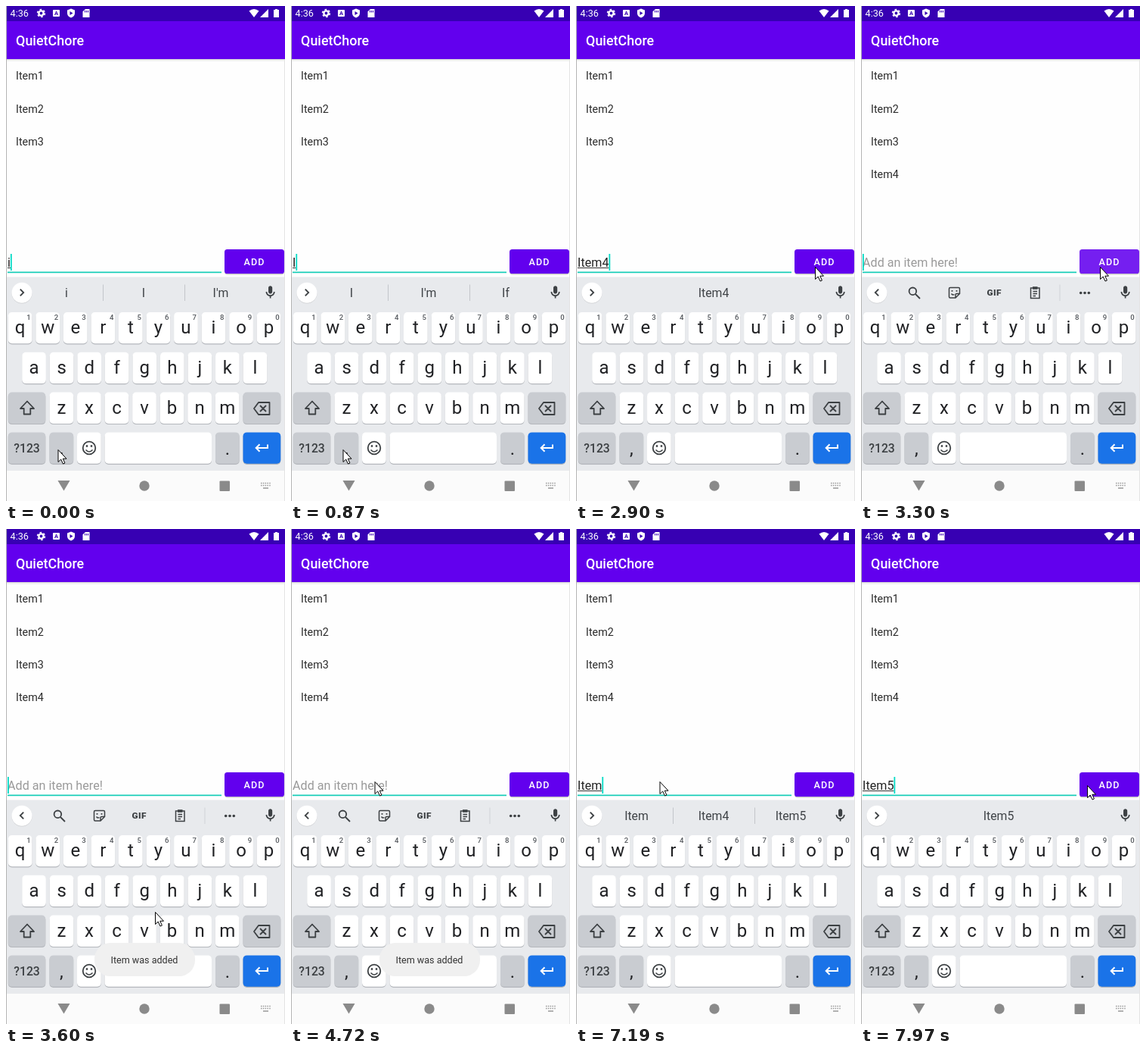
An HTML page that plays this animation: 369x653 px, repeating every 8 s.

```html
<!DOCTYPE html>
<html lang="en">
<head>
<meta charset="utf-8">
<title>To-do list</title>
<style>
  html, body { margin: 0; width: 100%; height: 100%; overflow: hidden; background: #fff; }
  svg { display: block; width: 369px; height: 653px; font-family: Roboto, "Noto Sans", sans-serif; }
  .mid { text-anchor: middle; }
  .line { fill: none; stroke: #3c4043; stroke-width: 1.8; }
</style>
</head>
<body>
<svg id="stage" viewBox="0 0 369 653">
  <rect width="369" height="653" fill="#fefefe"/>
  <rect y="70" width="369" height="1" fill="#000" opacity=".16"/>
  <rect y="71" width="369" height="2" fill="#000" opacity=".05"/>
  <rect y="20" width="369" height="50" fill="#6200ee"/>
  <rect width="369" height="20" fill="#3700b3"/>

  <g id="status" fill="#fff">
    <text x="5.5" y="14.2" font-size="12.7">4:36</text>
    <circle cx="46.5" cy="9.5" r="3.1" fill="none" stroke="#fff" stroke-width="2.4"/>
    <circle cx="46.5" cy="9.5" r="4.9" fill="none" stroke="#fff" stroke-width="1.6" stroke-dasharray="2.6 2.53"/>
    <rect x="62" y="5" width="9" height="9" rx="1"/>
    <text class="mid" x="66.5" y="12.3" font-size="7.5" font-weight="700" fill="#3700b3">A</text>
    <path d="M86 3.5l5 2v4c0 3-2 5-5 6-3-1-5-3-5-6v-4z"/>
    <path d="M84.5 7v5l4-2.5z" fill="#3700b3"/>
    <path d="M105 4h5.5v11h-9V7.5z"/>
    <path d="M104.5 6v2.5M106.5 6v2.5M108.5 6v2.5" stroke="#3700b3"/>
    <path d="M321.5 6.5q6.5-5 13 0L328 15z"/>
    <path d="M347 4v11h-11z"/>
    <path d="M354 5h2V4h3v1h2v10h-7z"/>
  </g>
  <text x="13" y="52.3" font-size="17.95" font-weight="500" fill="#fff">QuietChore</text>

  <g id="items" font-size="14.36" fill="#2b2b2b"></g>

  <g font-size="16.15">
    <text id="hint" x="2" y="344" fill="#9a9a9a">Add an item here!</text>
    <text id="entry" x="2" y="344" fill="#222"></text>
    <rect id="underline" x="2" y="345" height="1" fill="#333"/>
    <rect x="2" y="350.5" width="283" height="1.7" fill="#16cdb8"/>
    <rect id="caret" y="327" width="1.8" height="22" fill="#03dac5"/>
  </g>
  <rect x="289" y="322" width="79" height="32.5" rx="4" opacity=".2"/>
  <rect x="289" y="321" width="79" height="32" rx="3.6" fill="#6200ee"/>
  <rect id="ripple" x="289" y="321" width="79" height="32" rx="3.6" fill="#fff"/>
  <text x="314.5" y="342" font-size="12.57" font-weight="500" letter-spacing="1.12" fill="#fff">ADD</text>

  <rect y="357.5" width="369" height="255.5" fill="#e8eaed"/>
  <circle cx="21" cy="379" r="13.5" fill="#000" opacity=".12"/>
  <circle cx="21" cy="378.2" r="13.5" fill="#fff"/>
  <path id="chevron" class="line" d="M-2.2-4.4L2.2 0-2.2 4.4"/>
  <path transform="translate(339.3 367.5) scale(.86)" fill="#3c4043" d="M12 14c1.66 0 3-1.34 3-3V5c0-1.66-1.34-3-3-3S9 3.34 9 5v6c0 1.66 1.34 3 3 3zM17 11c0 2.76-2.24 5-5 5s-5-2.24-5-5H5c0 3.53 2.61 6.43 6 6.92V21h2v-3.08c3.39-.49 6-3.39 6-6.92z"/>

  <g id="words" class="mid" font-size="15.8" fill="#3f4347"></g>
  <path id="dividers" d="M128.5 367.5V389M236.5 367.5V389" stroke="#c3c6ca"/>
  <g id="tools">
    <g class="line">
      <circle cx="68.4" cy="376.3" r="4.8"/>
      <path d="M72 380l6 6"/>
      <path d="M118 371.5h11.5v8l-5 5H118q-1 0-1-1v-11q0-1 1-1zM130 379h-4.5q-1.500-1.500 5.500v5M120.500 379q2 3 4 1.500" stroke="none"/>
      <path d="M118 371.5h11q1.500 0 1.500 1.500v6.500l-5.500 5.500h-7q-1.500 0-1.500-1.500v-10.500q0-1.500 1.500-1.500zM130.500 379.500h-4q-1.500 0-1.500 1.500v4M119.500 379.500q2 2.500 4 1" stroke-width="1.500"/>
      <path d="M120.500 375v1.800M126.500 375v1.800"/>
      <path d="M224.500 372h11.500v13.500h-11.500zM227.500 376.500h5.500M227.500 379.500h5.500M227.500 382.500h3.500" stroke-width="1.500"/>
      <path d="M227 372h6.500" stroke-width="3.600"/>
    </g>
    <text class="mid" x="176.3" y="382.300" font-size="11.800" font-weight="900" letter-spacing=".5" fill="#3c4043">GIF</text>
    <path d="M263 367.500V389" stroke="#d0d3d7"/>
    <g fill="#3c4043"><circle cx="290.700" cy="378.500" r="1.800"/><circle cx="296" cy="378.500" r="1.800"/><circle cx="301.300" cy="378.500" r="1.800"/></g>
  </g>

  <g id="keys" class="mid" font-size="24" fill="#202124"></g>
  <g class="line">
    <path d="M28 521.500l9 9.500h-4.700v7.500h-8.600V531H19z" stroke-linejoin="round"/>
    <path d="M334 523h14.500v16H334l-6-8zM336 527l8 8M344 527l-8 8" stroke-linejoin="round"/>
    <circle cx="110" cy="583" r="8.300"/>
    <path d="M105.500 585.500q4.500 5 9 0" stroke-width="1.600"/>
    <path d="M107 579.200v2.600M113 579.200v2.600" stroke-width="2.400"/>
    <path d="M346 578.500v4.500H331M335.500 578.200l-4.800 4.800 4.800 4.800" stroke="#fff" stroke-width="2"/>
  </g>
  <g id="toast">
    <rect x="117" y="546" width="133" height="44" rx="21" fill="#f0f0f0"/>
    <text x="138.500" y="573" font-size="12.570" fill="#333">Item was added</text>
  </g>

  <rect y="613" width="369" height="40" fill="#fbfbfb"/>
  <g fill="#8a8a8a">
    <path d="M68.500 626h16L76.500 639.500z"/>
    <circle cx="183" cy="633" r="6.700"/>
    <rect x="282.500" y="626.500" width="13.500" height="13.500" rx="1"/>
    <path d="M337 629.500h13M337 632.500h13" stroke="#999" stroke-width="1.500" stroke-dasharray="1.500 1.300"/>
    <path d="M340 636h7" stroke="#999" stroke-width="1.500"/>
  </g>
  <path d="M.5 0V653" stroke="#b5b5b5"/>
  <path d="M368.500 71V653" stroke="#e4e4e4"/>
  <path id="mouse" d="M.5.500V16.500L4.200 13 7 19 9.400 18 6.800 12.200H11.500Z" fill="#fff" stroke="#000"/>
</svg>
<script>
const LOOP = 8000;
const $ = id => document.getElementById(id);

function add(parent, tag, attrs, text = '') {
  const node = document.createElementNS('http://www.w3.org/2000/svg', tag);
  for (const name in attrs) node.setAttribute(name, attrs[name]);
  node.textContent = text;
  return parent.appendChild(node);
}

const items = [1, 2, 3, 4].map((n, i) =>
  add($('items'), 'text', { x: 13, y: 97.4 + 43.1 * i }, 'Item' + n));
const words = [80, 182, 284].map(x => add($('words'), 'text', { x, y: 384.3 }));

function key(x, row, width, label = '', fill = '#fff', style = {}) {
  const y = 404 + 52.8 * row;
  add($('keys'), 'rect', { x, y: y + 1, width, height: 41.5, rx: 5, fill: '#b4b7bc' });
  add($('keys'), 'rect', { x, y, width, height: 41.3, rx: 5, fill });
  add($('keys'), 'text', { x: x + width / 2, y: y + 28, ...style }, label);
}

const PITCH = 36.55, KEY = 31.7, GREY = '#c9ccd1';
[['qwertyuiop', 2.8], ['asdfghjkl', 21.2], ['zxcvbnm', 57.5]].forEach(([letters, left], row) =>
  [...letters].forEach((c, i) => key(left + PITCH * i, row, KEY, c)));
for (let i = 0; i < 10; i++)
  add($('keys'), 'text', { x: 30 + PITCH * i, y: 414.2, 'font-size': 9.6, fill: '#55595e', 'font-weight': 500 }, (i + 1) % 10);
key(2.8, 2, 49.5, '', GREY);
key(313.5, 2, 49.8, '', GREY);
key(2.8, 3, 49.5, '?123', GREY, { 'font-size': 15.8, 'font-weight': 500, y: 588.7, fill: '#3c4043' });
key(57.5, 3, KEY, ',', GREY, { y: 592 });
key(94, 3, KEY);
key(130.6, 3, 141.4);
key(277, 3, KEY, '.', GREY, { y: 592 });
key(313.5, 3, 49.8, '', '#1a73e8');

// Each step changes only the listed parts; marked = underlined letters.
const steps = [
  [0, { text: 'i', marked: 1, words: ['i', 'I', "I'm"], caret: 1, mouse: [68.5, 585], count: 3, ripple: 0, toast: 0 }],
  [280, { text: '', marked: 0, words: null }],
  [580, { text: 'I', marked: 1 }],
  [870, { words: ['I', "I'm", 'If'] }],
  [1020, { text: 'It', marked: 2 }],
  [1170, { text: 'Ite', marked: 3, words: ['It', "It's", 'If'] }],
  [1320, { text: 'Item', marked: 4 }],
  [1470, { words: ['Item', 'Item1', 'Item5'] }],
  [1900, { caret: 0 }],
  [2360, { caret: 1, text: 'Item4', marked: 5 }],
  [2490, { words: ['', 'Item4', ''], mouse: [105, 560] }],
  [2630, { mouse: [215, 450] }],
  [2760, { mouse: [298, 362] }],
  [2900, { mouse: [316, 344] }],
  [3160, { ripple: .2 }],
  [3300, { ripple: .12, text: '', marked: 0, count: 4, words: null }],
  [3450, { ripple: 0, toast: .6, mouse: [285, 405] }],
  [3600, { toast: 1, mouse: [197, 505] }],
  [3720, { mouse: [152, 428] }],
  [3850, { caret: 0, mouse: [117, 346] }],
  [3990, { mouse: [110.5, 333] }],
  [4260, { caret: 1 }],
  [4720, { caret: 0 }],
  [5230, { caret: 1 }],
  [5365, { text: 'I', marked: 1 }],
  [5500, { toast: .5, words: ['I', "I'm", 'If'] }],
  [5635, { toast: 0, text: 'It', marked: 2 }],
  [5770, { words: ['It', "It's", 'If'] }],
  [5900, { text: 'Ite', marked: 3 }],
  [6030, { text: 'Item' }],
  [6330, { marked: 4, words: ['Item', 'Item4', 'Item5'] }],
  [6760, { caret: 0 }],
  [7190, { caret: 1 }],
  [7320, { text: 'Item5', marked: 5 }],
  [7450, { words: ['', 'Item5', ''], mouse: [135, 329] }],
  [7580, { mouse: [195, 323] }],
  [7710, { mouse: [260, 327] }],
  [7840, { mouse: [292, 335] }],
  [7970, { mouse: [299, 338] }]
];

const show = (node, on) => node.setAttribute('visibility', on ? 'visible' : 'hidden');

function draw(t) {
  const s = Object.assign({}, ...steps.filter(([at]) => at <= t).map(([, change]) => change));
  const entry = $('entry');
  entry.textContent = s.text;
  show($('hint'), !s.text);
  $('underline').setAttribute('width', s.marked ? entry.getSubStringLength(0, s.marked) : 0);
  $('caret').setAttribute('x', 2 + (s.text ? entry.getComputedTextLength() : 0));
  show($('caret'), s.caret);
  items.forEach((item, i) => show(item, i < s.count));

  words.forEach((word, i) => { word.textContent = s.words ? s.words[i] : ''; });
  show($('dividers'), s.words && s.words[0]);
  show($('tools'), !s.words);
  $('chevron').setAttribute('transform', `translate(21 378) scale(${s.words ? 1 : -1} 1)`);

  $('ripple').setAttribute('opacity', s.ripple);
  $('toast').setAttribute('opacity', s.toast);
  $('mouse').setAttribute('transform', `translate(${s.mouse})`);
}

const start = performance.now();
function tick() {
  draw((performance.now() - start) % LOOP);
  requestAnimationFrame(tick);
}
tick();
</script>
</body>
</html>
```
